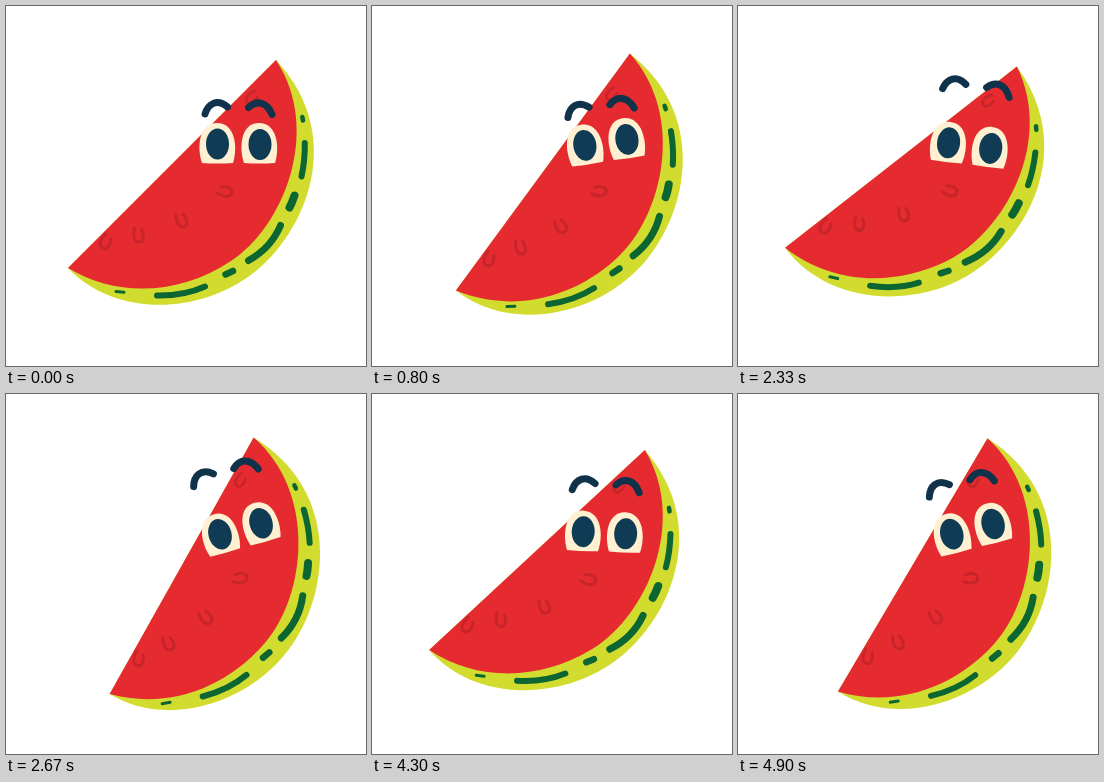
An HTML page for the animation above (5 s loop, 360x360 px).

```html
<!DOCTYPE html>
<html lang="en">
<head>
<meta charset="utf-8">
<title>Watermelon</title>
<style>
  html, body { margin: 0; width: 100%; height: 100%; overflow: hidden; background: #fff; }
  svg { display: block; width: 100vw; height: 100vh; }
  .line { fill: none; stroke-linecap: round; stroke-linejoin: round; }
  #marks { stroke: #0b6632; }
  #seeds { stroke: #c7252b; stroke-width: 3; }
  #brows { stroke: #10324a; stroke-width: 7; }
  #pupils { fill: #0f3b54; }
</style>
</head>
<body>
<svg viewBox="0 0 360 360">
  <defs>
    <path id="seed" d="M-4 -7C-7 3 -4 7 0 7C5 7 5 0 3 -5"/>
    <path id="eye" d="M196 157C190.500 141 193 117 211 117C229 117 232 141 227 157Q211 158 196 157Z"/>
    <path id="glint" d="M198 157C214 155 216 140 229.500 139Q229.500 149 227 157Z"/>
  </defs>
  <g id="melon">
    <path fill="#d2dc2f" d="M62 262C108 311 192 309 246 268C300 227 341 130 270 54Z"/>
    <path fill="#e62b30" d="M62 262C110 291 172 290 225 255C278 220 316 124 270 54Z"/>
    <g id="marks" class="line">
      <path stroke-width="3" d="M110 285.500L118 286.300"/>
      <path stroke-width="6" d="M151 289.500Q178 290 199 280.500"/>
      <path stroke-width="6.500" d="M219.500 268.500L227 265"/>
      <path stroke-width="7" d="M242.500 254.500Q265 242 274.500 219.500"/>
      <path stroke-width="8" d="M283.500 201.500Q286 197 288.500 189.500"/>
      <path stroke-width="6" d="M295.500 170.500Q299 155 298.800 137"/>
      <path stroke-width="4.500" d="M296.300 111L297 114.500"/>
    </g>
    <g id="seeds" class="line">
      <use href="#seed" transform="translate(100 236) rotate(28)"/>
      <use href="#seed" transform="translate(133 229) rotate(-4)"/>
      <use href="#seed" transform="translate(176 214) rotate(-20)"/>
      <use href="#seed" transform="translate(219 185) rotate(-75)"/>
      <use href="#seed" transform="translate(246 92) rotate(50) scale(.9)"/>
    </g>
    <g fill="#fff0d2">
      <use href="#eye"/>
      <use href="#eye" x="42"/>
    </g>
    <g id="glints" fill="#fff">
      <use href="#glint"/>
      <use href="#glint" x="42"/>
    </g>
    <g id="pupils">
      <ellipse cx="211.500" cy="138" rx="11.500" ry="15.500"/>
      <ellipse cx="254" cy="138.500" rx="11.500" ry="15.500"/>
    </g>
    <g id="brows" class="line">
      <path d="M199 108C202 98 211 92 221.500 101"/>
      <path d="M242.500 101.500C251 93.500 261 96 266 108.500"/>
    </g>
  </g>
</svg>
<script>
const LOOP = 5000, CYCLE = 2100, START = 100, STEP = 1000 / 15;
const RETURN = 700, GLANCE = 1100, BACK = 1600;
const el = id => document.getElementById(id);
const ramp = (t, from, to) => Math.min(1, Math.max(0, (t - from) / (to - from)));
const ease = p => (1 - Math.cos(Math.PI * p)) / 2;
const quick = (t, at) => ramp(t, at - STEP, at + STEP);

// Each move is held at 15 poses a second, counted from its own start.
function hold(t) {
  const from = [0, RETURN, GLANCE, BACK].findLast(s => s <= t);
  return from + Math.floor((t - from + 4) / STEP) * STEP;
}

function draw(now) {
  const t = hold((now % LOOP + CYCLE - START) % CYCLE);
  // Dip back, swing up, fall to rest.
  const tilt = -7 * ease(ramp(t, -80, 133)) + 24.3 * ease(ramp(t, 133, 533))
    - 17.3 * ramp(t, 533, 833) ** 1.2;
  const lift = 23 * (quick(t, 0) - quick(t, 600));
  const look = quick(t, GLANCE) - quick(t, BACK);
  el('melon').setAttribute('transform', `rotate(${-tilt} 221 130)`);
  el('brows').setAttribute('transform', `translate(0 ${-lift})`);
  el('pupils').setAttribute('transform', `translate(${-8 * look} ${look})`);
  el('glints').setAttribute('opacity', look);
}

const begin = performance.now();
function tick() {
  draw(performance.now() - begin);
  requestAnimationFrame(tick);
}
tick();
</script>
</body>
</html>
```
